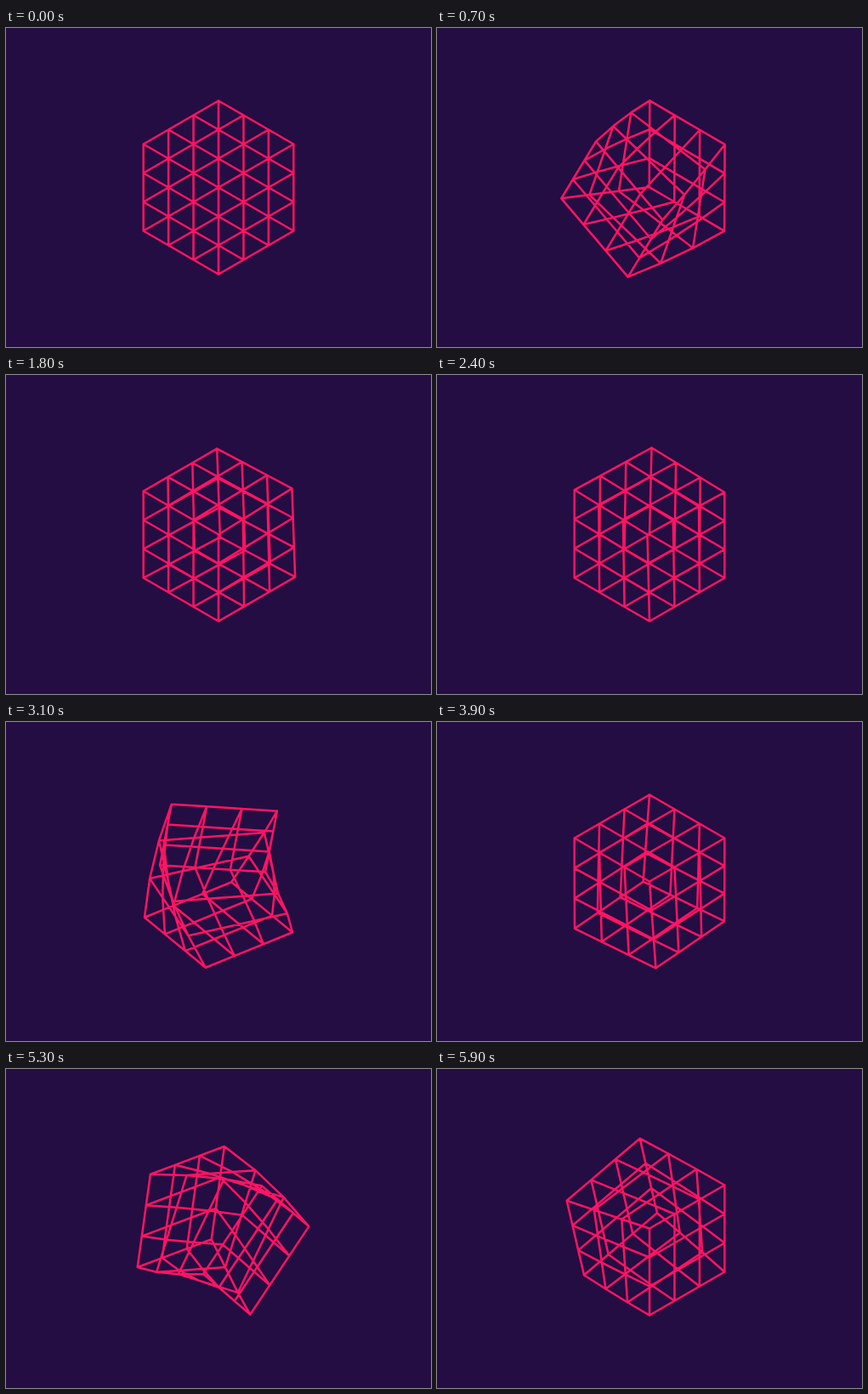
An HTML page that plays this animation: 500 by 375 pixels, repeating every 6 s.

```html
<!DOCTYPE html>
<html lang="en">
<head>
<meta charset="utf-8">
<title>Twisting cube</title>
<style>
  html, body { margin: 0; width: 100%; height: 100%; overflow: hidden; background: #240d42; }
  svg { display: block; width: 100vw; height: 100vh; }
  path { fill: none; stroke: #ff1464; stroke-width: 2.5; stroke-linecap: round; stroke-linejoin: round; }
</style>
</head>
<body>
<svg viewBox="0 0 500 375"><path id="grid"/></svg>
<script>
const LOOP = 6000, STEP = 100, TURN = 2200;
const N = 3;
const grid = document.getElementById('grid');

// Unit grid segments lying on the surface of the cube
const onFace = c => c === 0 || c === N;
const toUnit = p => p.map(c => 2 * c / N - 1);
const segments = [];
for (let i = 0; i <= N; i++)
  for (let j = 0; j <= N; j++)
    for (let k = 0; k <= N; k++)
      for (let d = 0; d < 3; d++) {
        const p = [i, j, k];
        if (p[d] === N || !(onFace(p[(d + 1) % 3]) || onFace(p[(d + 2) % 3]))) continue;
        const q = p.slice();
        q[d]++;
        segments.push([toUnit(p), toUnit(q)]);
      }

// Bezier ease with flat ends; x1 and x2 are the handle positions in time
function ease(x, x1, x2) {
  if (x <= 0) return 0;
  if (x >= 1) return 1;
  let lo = 0, hi = 1;
  for (let n = 0; n < 30; n++) {
    const s = (lo + hi) / 2, r = 1 - s;
    if (3 * s * r * r * x1 + 3 * s * s * r * x2 + s * s * s < x) lo = s;
    else hi = s;
  }
  return lo * lo * (3 - 2 * lo);
}

function project([x, y, z]) {
  const px = 250 + 44.17 * (x - z);
  const py = 187.5 + 25.5 * (x + z) - 51 * y;
  return px.toFixed(2) + ' ' + py.toFixed(2);
}

function draw(time) {
  const t = Math.floor(time % LOOP / STEP) * STEP;
  const axis = 2 - Math.floor(t / TURN);
  const local = t % TURN;
  const lead = ease(local / 1367, 0.66, 0.67);
  const trail = ease((local - 648) / 1420, 0.36, 0.28);
  const a = (axis + 2) % 3, b = (axis + 1) % 3;

  const twist = p => {
    const v = (1 - p[axis]) / 2;
    const angle = Math.PI / 2 * (lead + (trail - lead) * v);
    const c = Math.cos(angle), s = Math.sin(angle);
    const out = p.slice();
    out[a] = p[a] * c - p[b] * s;
    out[b] = p[a] * s + p[b] * c;
    return out;
  };

  grid.setAttribute('d', segments.map(([p, q]) =>
    'M' + project(twist(p)) + 'L' + project(twist(q))).join(''));
}

let start = null;
function tick(now) {
  if (start === null) start = now;
  draw(now - start);
  requestAnimationFrame(tick);
}
draw(0);
requestAnimationFrame(tick);
</script>
</body>
</html>
```
